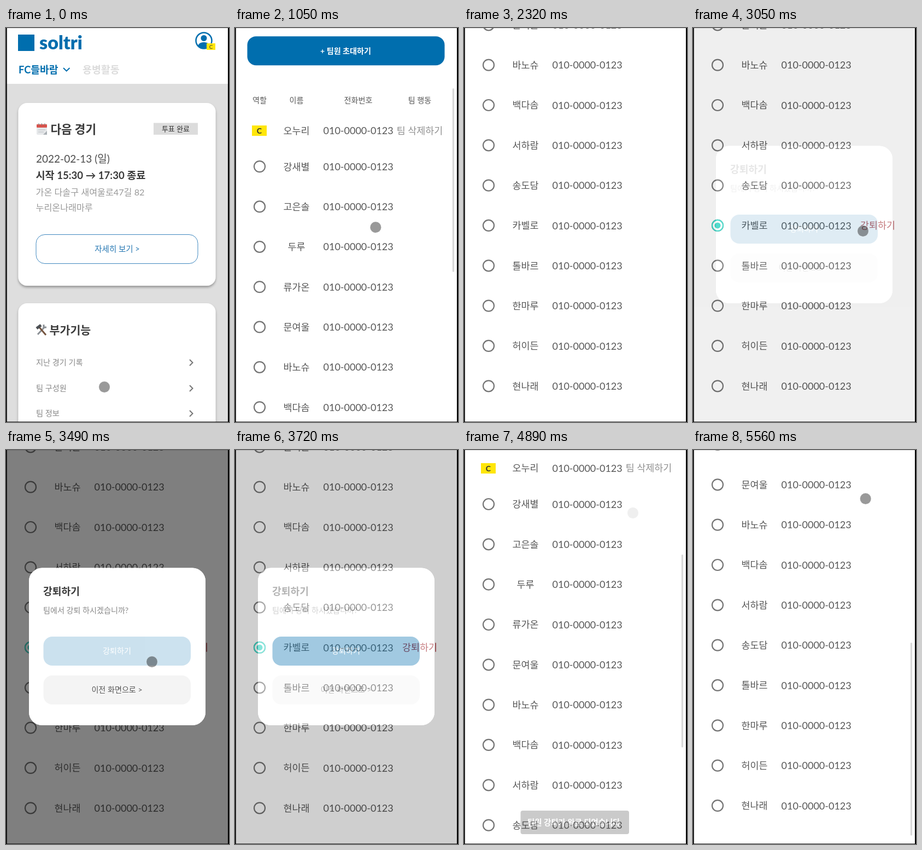
An HTML page that plays this animation: 408x720 px, repeating every 5.59 s.

```html
<!DOCTYPE html>
<html lang="ko">
<head>
<meta charset="utf-8">
<title>팀 구성원</title>
<style>
html, body { margin: 0; width: 100%; height: 100%; overflow: hidden; background: #fff; }
svg { display: block; font-family: Lato, 'Noto Sans CJK KR', 'Noto Sans CJK', sans-serif; }
.line { fill: none; stroke-width: 2; }
</style>
</head>
<body>
<svg id="stage" width="408" height="720" viewBox="0 0 408 720"></svg>
<script>
const LOOP = 5590, ROW = 73.33, RELOAD = 3900;
const BLUE = '#006eae', YELLOW = '#ffe60a', DARK = '#3a3a3a', GREY = '#888', INK = '#575757';
const TEAM = 'FC들바람', PHONE = '010-0000-0123';
const NAMES = ['강새별', '고은솔', '두루', '류가온', '문여울', '바노슈', '백다솜', '서하람',
  '송도담', '카벨로', '톨바르', '한마루', '허이든', '현나래'];
const REMOVED = 9;

// Text is placed by its visual middle.
const text = (s, x, y, size, fill, weight = 400, anchor = 'start') =>
  `<text x="${x}" y="${y + size * .37}" font-size="${size}" fill="${fill}" font-weight="${weight}" text-anchor="${anchor}">${s}</text>`;
const mid = (s, x, y, size, fill, weight) => text(s, x, y, size, fill, weight, 'middle');
const box = (x, y, x2, y2, r, fill, more = '') =>
  `<rect x="${x}" y="${y}" width="${x2 - x}" height="${y2 - y}" rx="${r}" fill="${fill}" ${more}/>`;
const dot = (x, y, r, fill, more = '') => `<circle cx="${x}" cy="${y}" r="${r}" fill="${fill}" ${more}/>`;
const line = (d, stroke, more = '') => `<path class="line" d="${d}" stroke="${stroke}" ${more}/>`;
const group = (id, body) => `<g id="${id}">${body}</g>`;

const card = (y, y2) => box(22.5, y, 383.5, y2, 16, '#fff', 'filter="url(#shadow)"');
const menuRow = (s, y) => text(s, 55, y, 14.2, GREY) + line(`M336 ${y - 5}l5.5 5.5l-5.5 5.5`, '#777');

const calendar = box(56, 176, 75, 195, 2, '#e6e8ea') + box(56, 176, 75, 182, 1, '#d9544d') +
  line('M60 174v4M65.500 174v4M71 174v4', '#777', 'style="stroke-width:1"') +
  line('M59 186h13M59 190h10', '#b9bec2', 'style="stroke-width:1"') + '<path d="M75 188v7h-7z" fill="#aab0b5"/>';
const tools = line('M58 560L71 546', '#8a8f94', 'style="stroke-width:3"') +
  line('M73 561L61 547', '#74543f', 'style="stroke-width:3"') +
  line('M56 549l8-6', '#4c5054', 'style="stroke-width:5"') +
  line('M69 542v5h5', '#8a8f94', 'style="stroke-width:3"');

const home = box(0, 0, 408, 720, 0, '#dedede') + box(0, 0, 408, 102, 0, '#fff') +
  box(22, 12, 52, 42, 0, BLUE) + text('soltri', 61, 26, 34, BLUE, 900) +
  dot(362, 23, 14.5, '#fff', `stroke="${BLUE}" stroke-width="2.5"`) + dot(362, 18.5, 5.5, BLUE) +
  `<path d="M351.500 32c2-8 19-8 21 0a14 14 0 0 1-21 0z" fill="${BLUE}"/>` +
  box(367, 28, 383, 40, 0, YELLOW) + mid('C', 375, 34, 10, DARK) +
  text(TEAM, 23, 76, 18.2, BLUE, 700) + line('M105 73l5.700 5.700l5.700-5.700', BLUE) +
  text('용병활동', 140, 76, 18.4, '#dcdcdc', 700) +
  card(137, 471) + calendar + text('다음 경기', 81.5, 185, 21.3, DARK, 700) +
  box(270, 173.500, 351, 195, 0, '#dcdcdc') + mid('투표 완료', 310.5, 184.5, 13, '#333') +
  text('2022-02-13 (일)', 55, 239, 19, '#4c4c4c') +
  text('시작 15:30 → 17:30 종료', 54.5, 269, 18.6, DARK, 700) +
  text('가온 다솔구 새여울로47길 82', 54.5, 300, 16.2, '#999') +
  text('누리온나래마루', 54.5, 328, 16.2, '#999') +
  box(55, 377.5, 351, 430.5, 16, '#fff', 'stroke="#3f88bf"') +
  mid('자세히 보기 &gt;', 203.5, 403.5, 14.5, '#2778b3') +
  card(503, 780) + tools + text('부가기능', 79.5, 552, 20.6, DARK, 700) +
  menuRow('지난 경기 기록', 611) + menuRow('팀 구성원', 658) + menuRow('팀 정보', 704);

const rowY = i => 483 + i * ROW;
const memberRow = (name, i) => dot(45, rowY(i), 10, 'none', 'stroke="#757575" stroke-width="2.2"') +
  mid(name, 112.5, rowY(i), 17.4, INK) + text(PHONE, 161.5, rowY(i), 18, INK);
const rows = NAMES.map(memberRow), pickY = rowY(REMOVED);

const members = box(0, 0, 408, 207, 0, '#f4f4f4') + line('M28.500 46.500l13 13m0-13l-13 13', '#333') +
  text('팀 구성원', 22.5, 142, 23.9, DARK, 700) + text(TEAM, 23, 173, 18.2, INK) +
  box(22.5, 245, 383.5, 298, 16, BLUE) + mid('+ 팀원 초대하기', 202.5, 272, 14.1, '#fff', 700) +
  [['역할', 45], ['이름', 112.5], ['전화번호', 225.5], ['팀 행동', 338]].map(([s, x]) => mid(s, x, 362, 14.1, INK)).join('') +
  box(31, 408, 58, 427, 0, YELLOW) + mid('C', 44.5, 417.5, 14, '#333', 700) +
  mid('오누리', 112.5, 417, 17.4, INK) + text(PHONE, 161.5, 417, 18, INK) +
  mid('팀 삭제하기', 338, 417, 17.4, '#909090') +
  rows.slice(0, REMOVED).join('') +
  group('target', rows[REMOVED] + dot(45, pickY, 18, '#000', 'id="ripple"') +
    group('picked', dot(45, pickY, 10, '#fff', 'stroke="#3dd6c6" stroke-width="2.2"') + dot(45, pickY, 5.5, '#3dd6c6') +
      group('kick', mid('강퇴하기', 338, pickY, 17.4, '#a52f35')))) +
  group('rest', rows.slice(REMOVED + 1).join(''));

const dialog =
  '<path d="M0 0H408V720H0zM66 215.500H341a24 24 0 0 1 24 24V479a24 24 0 0 1-24 24H66a24 24 0 0 1-24-24V239.500a24 24 0 0 1 24-24z" fill-rule="evenodd" fill-opacity=".5"/>' +
  box(42, 215.5, 365, 503, 24, '#fff') +
  text('강퇴하기', 68, 258, 18.2, DARK, 700) + text('팀에서 강퇴 하시겠습니까?', 68, 293, 14.1, GREY) +
  group('confirm', box(68.5, 341, 338, 394, 16, BLUE) + mid('강퇴하기', 203, 367, 14.1, '#fff')) +
  box(68.5, 412, 338, 465, 16, '#f4f4f4') + mid('이전 화면으로 &gt;', 203, 438, 14.1, INK);

const toast = box(103.5, 659, 302, 702, 4, '#373737') + mid('팀원 강퇴가 완료 되었습니다.', 202.5, 681, 14.4, '#fff', 700);

const stage = document.getElementById('stage');
stage.innerHTML = `<defs><filter id="shadow" x="-5%" y="-5%" width="110%" height="112%">
  <feDropShadow dx="0" dy="3" stdDeviation="2" flood-opacity=".32"/></filter></defs>` +
  home +
  group('page', box(0, 0, 408, 720, 0, '#fff') + group('list', members) +
    box(397.8, 0, 401, 1, 1.5, '#d8d8d8', 'id="bar"')) +
  group('dialog', dialog) + group('toast', toast) +
  dot(0, 0, 10.2, '#000', 'id="touch" fill-opacity=".4" stroke="#fff" stroke-opacity=".3"') +
  box(0, 0, 408, 1, 0, '#000', 'opacity=".15"') +
  box(0, 0, 1.7, 720, 0, '#000') + box(406, 0, 408, 720, 0, '#000') + box(0, 719.3, 408, 720, 0, '#000');

const el = id => document.getElementById(id);
const ramp = (t, a, b) => Math.min(1, Math.max(0, (t - a) / (b - a)));
const ease = (t, a, b) => { const p = ramp(t, a, b); return p * p * (3 - 2 * p); };
const pulse = (t, a, b, fadeIn, fadeOut) => ramp(t, a, a + fadeIn) * (1 - ramp(t, b, b + fadeOut));
const fade = (id, v) => el(id).setAttribute('opacity', v);

const scrollAt = t => t < RELOAD
  ? 356 * ease(t, 680, 1300) + 289 * ease(t, 1310, 1750) + 137 * ease(t, 1850, 2090)
  : 420 * ease(t, 4395, 5000) + 293 * ease(t, 5040, 5560);

// Each touch: down, up, x at both ends, y on the scrolled page.
const TOUCHES = [
  [-99, 230, 180, 180, 656], [660, 1140, 250, 259, 594], [1310, 2090, 262, 269, 861],
  [2340, 2460, 45, 45, 1143], [2840, 3050, 311, 311, 1153], [3370, 3520, 267, 267, 1169],
  [4360, 4790, 304, 309, 499], [5040, 5600, 312, 316, 802]
];

function draw(t) {
  const s = scrollAt(t), reloaded = t >= RELOAD;
  fade('page', ramp(t, 280, 520));
  el('list').setAttribute('transform', `translate(0 ${-s})`);
  fade('target', reloaded ? 0 : 1);
  el('rest').setAttribute('transform', `translate(0 ${reloaded ? -ROW : 0})`);
  fade('ripple', .12 * pulse(t, 2360, 2460, 60, 180));
  fade('picked', t >= 2450 ? 1 : 0);
  fade('kick', 1 - .8 * pulse(t, 2850, 2950, 80, 150));
  fade('dialog', pulse(t, 3015, 3590, 300, 210));
  fade('confirm', 1 - .8 * pulse(t, 3390, 3530, 90, 200));
  fade('toast', pulse(t, 3980, 4780, 120, 150));

  const k = 718 / (reloaded ? 1540 - ROW : 1540), bar = el('bar');
  bar.setAttribute('y', 3 + s * k);
  bar.setAttribute('height', 720 * k);
  fade('bar', pulse(t, 690, 2130, 30, 200) + pulse(t, 4395, 9999, 30, 1));

  const touch = TOUCHES.find(([down, up]) => t >= down && t < up + 120);
  fade('touch', touch ? pulse(t, touch[0], touch[1], 30, 120) : 0);
  if (touch) {
    const [down, up, x0, x1, y] = touch;
    el('touch').setAttribute('cx', x0 + (x1 - x0) * ramp(t, down, up));
    el('touch').setAttribute('cy', y - s);
  }
}

function tick() {
  draw(performance.now() % LOOP);
  requestAnimationFrame(tick);
}
tick();
</script>
</body>
</html>
```
